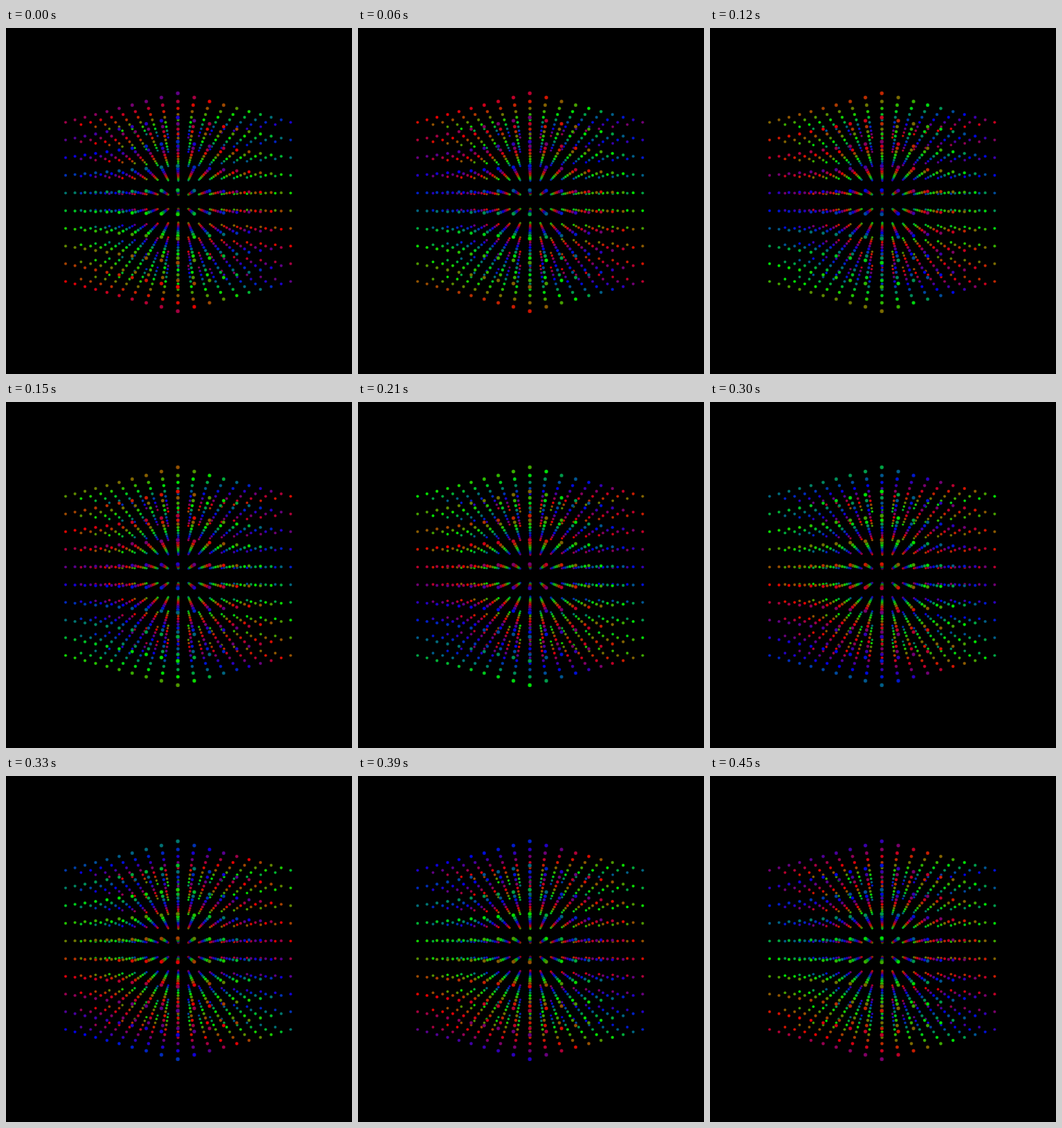
These frames come from a looping animation (500x500 px, 0.48 s). An HTML page:

```html
<!DOCTYPE html>
<html lang="en">
<head>
<meta charset="utf-8">
<title>Colour cube</title>
<style>
  html, body { margin: 0; width: 100%; height: 100%; overflow: hidden; background: #000; }
  svg { display: block; width: 100vw; height: 100vh; }
</style>
</head>
<body>
<svg id="stage" viewBox="0 0 500 500"></svg>
<script>
const N = 10;              // balls per side
const LOOP = 480, STEP = 30;
const FOCAL = 250 / Math.tan(Math.PI / 8);
const DIST = 23.62;        // eye to cube centre, in ball spacings
const RADIUS = 0.082;
const SHIFT = 0.05;        // cube centre, off the view axis
const HUE = 290, STEP_X = 36, STEP_Y = -36, STEP_Z = 3.6;

const stage = document.getElementById('stage');
const balls = [];

function addBall(x, y, z) {
  const depth = DIST + (x + z - (N - 1)) * Math.SQRT1_2;
  const scale = FOCAL / depth;
  const r = RADIUS * scale;
  const el = document.createElementNS('http://www.w3.org/2000/svg', 'circle');
  const attrs = {
    cx: 250 + ((x - z) * Math.SQRT1_2 - SHIFT) * scale,
    cy: 250 + (y - (N - 1) / 2 + SHIFT) * scale,
    r,
    stroke: '#000',
    'stroke-opacity': 0.28,
    'stroke-width': r * 0.4
  };
  for (const name in attrs) el.setAttribute(name, attrs[name]);
  balls.push({ el, depth, hue: HUE + x * STEP_X + y * STEP_Y + z * STEP_Z });
}

// Red, green and blue fade linearly into each other.
function wheel(hue) {
  const pos = (((hue % 360) + 360) % 360) / 120;
  const part = centre => {
    const d = Math.abs(pos - centre);
    return Math.round(232 * Math.max(0, 1 - Math.min(d, 3 - d)));
  };
  return `rgb(${part(0)},${part(1)},${part(2)})`;
}

for (let x = 0; x < N; x++)
  for (let y = 0; y < N; y++)
    for (let z = 0; z < N; z++) addBall(x, y, z);

balls.sort((a, b) => b.depth - a.depth);
balls.forEach(b => stage.appendChild(b.el));

let shown = -1;
function draw(ms) {
  const step = Math.floor((ms % LOOP) / STEP);
  if (step === shown) return;
  shown = step;
  const turn = step * STEP / LOOP * 360;
  for (const b of balls) b.el.setAttribute('fill', wheel(b.hue + turn));
}

const start = performance.now();
function tick() {
  draw(performance.now() - start);
  requestAnimationFrame(tick);
}
tick();
</script>
</body>
</html>
```
